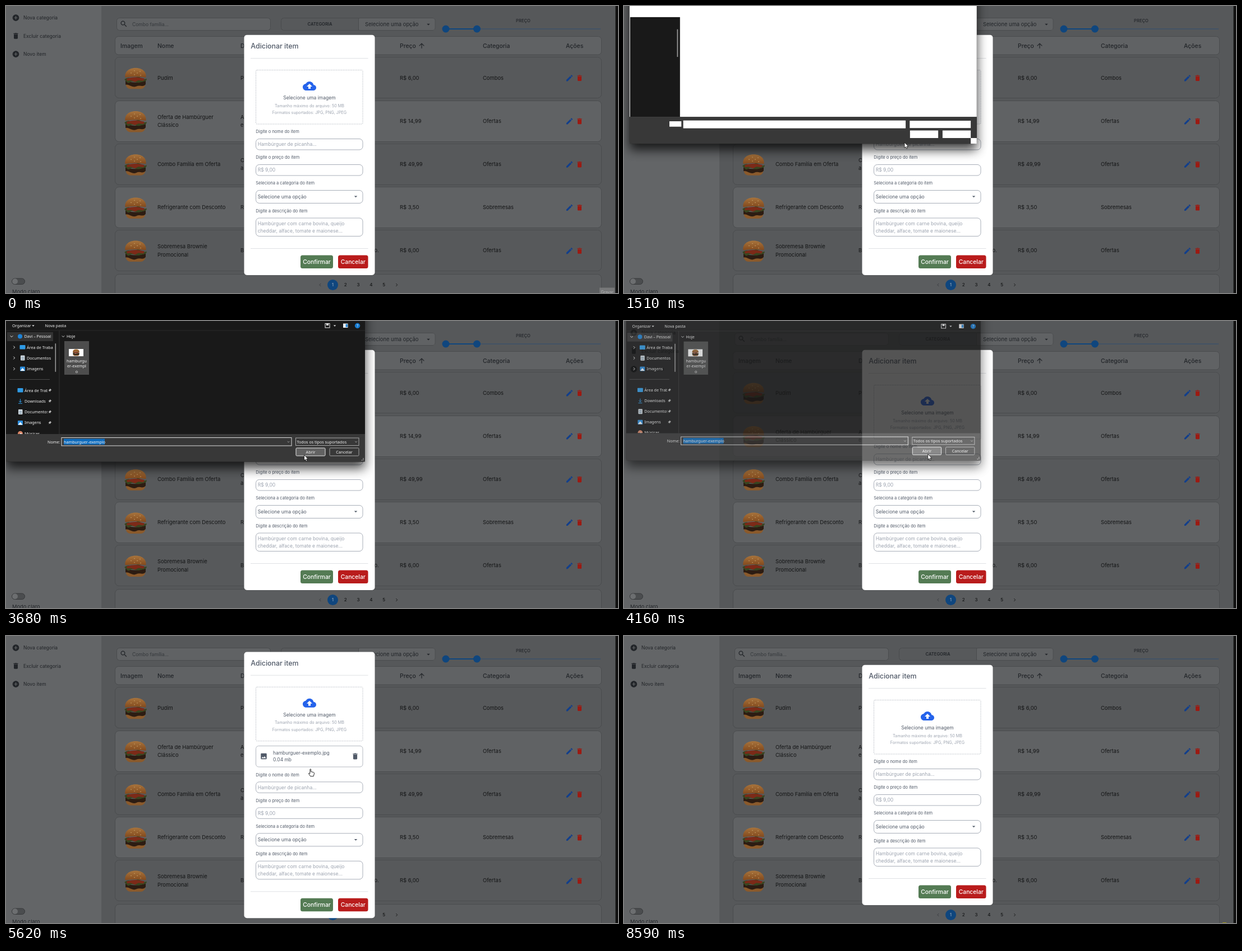
An HTML page that plays this animation: 1091 by 513 pixels, repeating every 8660 ms.

```html
<!DOCTYPE html>
<html lang="pt-BR">
<head>
<meta charset="utf-8">
<title>Adicionar item</title>
<style>
html, body { margin: 0; width: 100%; height: 100%; overflow: hidden; background: #56585a; }
svg { display: block; width: 1091px; height: 513px; font-family: Inter, sans-serif; }
text { white-space: pre; }
#dialog { font-family: "Noto Sans", "Open Sans", sans-serif; }
</style>
</head>
<body>
<svg id="stage" viewBox="0 0 1091 513"></svg>
<script>
const LOOP = 8660;
const SHIFT = 23.3;

const ICONS = {
  plus: 'M12 2C6.48 2 2 6.48 2 12s4.48 10 10 10 10-4.48 10-10S17.52 2 12 2zm5 11h-4v4h-2v-4H7v-2h4V7h2v4h4v2z',
  trash: 'M6 19c0 1.1.9 2 2 2h8c1.1 0 2-.9 2-2V7H6v12zM19 4h-3.5l-1-1h-5l-1 1H5v2h14V4z',
  pencil: 'M3 17.25V21h3.75L17.81 9.94l-3.75-3.75L3 17.25zM20.71 7.04c.39-.39.39-1.02 0-1.41l-2.34-2.34c-.39-.39-1.02-.39-1.41 0l-1.83 1.83 3.75 3.75 1.83-1.83z',
  search: 'M15.5 14h-.79l-.28-.27C15.41 12.59 16 11.11 16 9.5 16 5.91 13.09 3 9.5 3S3 5.91 3 9.5 5.91 16 9.5 16c1.61 0 3.09-.59 4.23-1.57l.27.28v.79l5 4.99L20.49 19l-4.99-5zm-6 0C7.01 14 5 11.99 5 9.5S7.01 5 9.5 5 14 7.01 14 9.5 11.99 14 9.5 14z',
  image: 'M21 19V5c0-1.1-.9-2-2-2H5c-1.1 0-2 .9-2 2v14c0 1.1.9 2 2 2h14c1.1 0 2-.9 2-2zM8.5 13.5l2.5 3.01L14.5 12l4.5 6H5l3.5-4.5z',
  cloud: 'M19.35 10.04C18.67 6.59 15.64 4 12 4 9.11 4 6.6 5.64 5.35 8.04 2.34 8.36 0 10.91 0 14c0 3.31 2.69 6 6 6h13c2.76 0 5-2.24 5-5 0-2.64-2.05-4.78-4.65-4.96zM14 13v4h-4v-4H7l5-5 5 5h-3z',
  up: 'M4 12l1.41 1.41L11 7.83V20h2V7.83l5.58 5.59L20 12l-8-8-8 8z',
  caret: 'M7 9.5l5 5 5-5z',
  right: 'M9 6l6 6-6 6', left: 'M15 6l-6 6 6 6', down: 'M6 9l6 6 6-6',
  pin: 'M14 3l7 7-2 1-4 4-1 4-4-4-6 5 5-6-4-4 4-1 4-4z'
};

// Markup helpers; text and icons are placed by their centre line
const text = (x, cy, size, str, fill, attrs = '') =>
  `<text x="${x}" y="${cy + size * .355}" font-size="${size}" fill="${fill}" ${attrs}>${str}</text>`;
const mid = 'text-anchor="middle"';
const rect = (x, y, w, h, fill, attrs = '') =>
  `<rect x="${x}" y="${y}" width="${w}" height="${h}" fill="${fill}" ${attrs}/>`;
const box = (x, y, w, h, fill, stroke, r) => rect(x, y, w, h, fill, `stroke="${stroke}" rx="${r}"`);
const line = (x1, y1, x2, y2, color, w = 1) =>
  `<path d="M${x1} ${y1}L${x2} ${y2}" stroke="${color}" stroke-width="${w}"/>`;
const disc = (x, y, r, fill) => `<circle cx="${x}" cy="${y}" r="${r}" fill="${fill}"/>`;
const place = (x, y, scale) => `transform="translate(${x} ${y}) scale(${scale}) translate(-12 -12)"`;
const icon = (name, x, y, scale, fill) => `<path ${place(x, y, scale)} d="${ICONS[name]}" fill="${fill}"/>`;
const stroke = (name, x, y, scale, color) =>
  `<path ${place(x, y, scale)} d="${ICONS[name]}" fill="none" stroke="${color}" stroke-width="2.4"/>`;
const burger = (x, y, scale = 1) => `<use href="#burger" transform="translate(${x} ${y}) scale(${scale})"/>`;

const defs = `<defs>
  <linearGradient id="bun" x2="0" y2="1"><stop stop-color="#a8743c"/><stop offset="1" stop-color="#82491d"/></linearGradient>
  <g id="burger">
    <path d="M-17 8C-18 15-14 18-9 18.5H9C14 18 18 15 17 8Z" fill="#8a5a2c"/>
    <path d="M-18 4q18 6 36 0v6q-3 4-8 3t-9 1-10-1-9-2Z" fill="#2c1c12"/>
    <path d="M-19.5 1q5-4 10-2t10-1 9 1 10 1q1 4-4 5t-8 2-9-1-9 1-9-5Z" fill="#38451f"/>
    <path d="M-16 0q16-5 32 0l-2 4-9-1-6 3-8-3-6 1Z" fill="#7c2a18"/>
    <path d="M-18.5-2C-20-13-11-19 0-19S20-13 18.5-2Q0-5-18.500-2Z" fill="url(#bun)"/>
    <path d="M-9-10h2m4-4h2m3 4h2m3-3h2m-12 6h2m9 1h2" stroke="#c29a62"/>
  </g>
  <filter id="blur" x="-20%" y="-30%" width="140%" height="160%"><feGaussianBlur stdDeviation="10"/></filter>
  <clipPath id="nav"><rect y="17" width="84" height="185"/></clipPath>
  <clipPath id="quick"><rect y="17" width="74" height="185"/></clipPath>
</defs>`;

const ITEMS = [
  [['Pudim'], 'P', '6,00', 'Combos'],
  [['Oferta de Hambúrguer', 'Clássico'], 'Ae', '14,99', 'Ofertas'],
  [['Combo Família em Oferta'], 'Ca', '49,99', 'Ofertas'],
  [['Refrigerante com Desconto'], 'R', '3,50', 'Sobremesas'],
  [['Sobremesa Brownie', 'Promocional'], 'B', '6,00', 'Ofertas']
];

function page() {
  const ink = '#141516', soft = '#222529', edge = '#4a4c4e', pale = '#606264', dim = '#57595b';
  const blue = '#0f467e', red = '#9c1a12';
  const stack = (x, cy, lines) => lines.map((s, i) =>
    text(x, cy + (i - (lines.length - 1) / 2) * 14.2, 9.4, s, ink)).join('');
  let s = rect(0, 0, 1091, 513, '#56585a') + rect(0, 0, 170, 513, '#636567');
  [['plus', 'Nova categoria', 21], ['trash', 'Excluir categoria', 53.5], ['plus', 'Novo item', 86]].forEach(([i, label, y]) =>
    s += icon(i, 17.5, y, .58, soft) + text(31, y, 8.5, label, soft));
  s += box(10.5, 487, 23, 10.5, '#4b4d4f', '#36383a', 5.2) + disc(16, 492.2, 5, '#6c6e70') + text(11, 511, 9.3, 'Modo claro', soft);

  s += box(197.5, 21.5, 274, 22, pale, edge, 5) + icon('search', 210, 32, .62, soft) + text(225, 32.5, 8.5, 'Combo família...', '#35383c');
  s += box(490.5, 21.5, 274.5, 22, dim, edge, 5) + rect(628, 22, 136.5, 21, pale, 'rx="4"') + line(628.5, 22, 628.5, 43, edge);
  s += text(559.5, 32.5, 7.6, 'CATEGORIA', soft, mid + ' font-weight="600"') + text(640, 32.5, 9.4, 'Selecione uma opção', soft) + icon('caret', 753, 33, .55, soft);
  s += text(922, 26, 7.6, 'PREÇO', soft, mid + ' font-weight="500"') + line(784, 41, 1060, 41, '#3c5168', 1.6) +
    line(784, 41, 839, 41, blue, 2.2) + disc(784, 41, 6.5, blue) + disc(839.5, 41, 6.5, blue);

  s += box(194.5, 54.5, 867, 32.5, pale, edge, 6);
  [[204, 'Imagem'], [270, 'Nome'], [418, 'D'], [702, 'Preço'], [850, 'Categoria'], [998, 'Ações']].forEach(([x, label]) =>
    s += text(x, 71, 10.4, label, soft, 'font-weight="500"'));
  s += icon('up', 741, 71, .6, soft);

  ITEMS.forEach(([name, desc, price, group], i) => {
    const y = 128.3 + i * 77.2;
    s += box(194.5, Math.round(y - 37) + .5, 867, 73, i % 2 ? pale : dim, edge, 7) + burger(231, y + 1.5) +
      stack(270, y, name) + stack(418, y, [...desc]) + text(702, y, 9.4, 'R$ ' + price, ink) +
      text(850, y, 9.4, group, ink) + icon('pencil', 1004.5, y + .5, .62, '#123f8c') + icon('trash', 1022.5, y + .5, .58, red);
  });
  s += text(656.5, 437, 9.4, 'o.', ink);

  s += box(194.5, 479.5, 867, 50, '#5b5d5f', edge, 7) + disc(582.5, 498.5, 9.5, blue);
  for (let n = 1; n < 6; n++) s += text(559.7 + n * 22.8, 498.5, 8, n, n > 1 ? ink : '#8fa3ba', mid + ' font-weight="500"');
  s += stroke('left', 560, 498.5, .4, '#35383c') + stroke('right', 696.5, 498.5, .4, ink);
  return s + rect(1086.5, 0, 4.5, 513, '#101010') +
    `<g id="tip">${rect(1058, 503.5, 27, 10, '#777879') + text(1071.5, 512, 7, 'Gravar', '#b9babb', mid)}</g>` +
    `<g id="spark">${rect(1067, 512, 7, 1, '#a59a1c')}</g>`;
}

function modal() {
  const dark = '#515a68', hint = '#9ca3af', border = '#a8aeb8';
  const button = (x, w, fill, label) => rect(x, 445.5, w, 23.5, fill, 'rx="3.5"') +
    text(x + w / 2, 457.3, 10.3, label, '#fff', mid + ' font-weight="500"');
  const field = (y, h, label, lines, color) => text(445.3, y - 12.7, 7.5, label, dark) +
    box(445.5, y, 190.5, h, '#fff', border, 6) +
    lines.map((l, i) => text(448.7, y + h / 2 + (i - (lines.length - 1) / 2) * 13, 8.55, l, color)).join('');
  return `<rect id="card" x="424.5" width="233" rx="5" fill="#fff"/>
  <g id="upper">${text(436.3, 72, 12.4, 'Adicionar item', dark, 'font-weight="500"')}
    ${line(436, 93.5, 645.5, 93.5, '#dfe1e4')}
    <rect id="zone" x="445.5" y="114.5" width="190.5" height="96.5" rx="2" stroke="#b3b8c0" stroke-dasharray="1.5 1.5"/>
    ${icon('cloud', 541, 143, 1, '#2563eb')}
    ${text(541, 164, 8.5, 'Selecione uma imagem', dark, mid)}
    ${text(541, 178, 7.2, 'Tamanho máximo do arquivo: 50 MB', hint, mid)}
    ${text(541, 190.5, 7.2, 'Formatos suportados: JPG, PNG, JPEG', hint, mid)}</g>
  <g id="file">${box(445.5, 196.5, 190.5, 37.5, '#fff', '#b4b9c1', 5)}
    <g id="fileInfo">${icon('image', 459.5, 215, .58, dark)}
    ${text(476, 209.5, 8.45, 'hamburguer-exemplo.jpg', dark)}
    ${text(476, 221.5, 8.45, '0.04 mb', dark)}
    ${icon('trash', 622.5, 215, .6, dark)}</g></g>
  <g id="lower">${field(237.5, 19.5, 'Digite o nome do item', ['Hambúrguer de picanha...'], hint)}
    ${field(283.5, 19.5, 'Digite o preço do item', ['R$ 9,00'], hint)}
    ${field(329.5, 23, 'Seleciona a categoria do item', ['Selecione uma opção'], dark)}
    ${icon('caret', 623.5, 341, .55, dark)}
    ${field(379, 32.5, 'Digite a descrição do item', ['Hambúrguer com carne bovina, queijo', 'cheddar, alface, tomate e maionese...'], hint)}
    ${line(436, 433.5, 645.5, 433.5, '#dfe1e4')}
    ${button(525, 58, '#547b54', 'Confirmar')}${button(592, 53.5, '#b91c1c', 'Cancelar')}</g>`;
}

function dialog() {
  const ink = '#f1f1f1', size = 7.2;
  const label = (x, y, str, attrs) => text(x, y, size, str, ink, attrs);
  const picture = {
    desk: (x, y) => rect(x - 5, y - 4, 10, 7.5, '#2f9be6', 'rx="1"'),
    doc: (x, y) => rect(x - 3.5, y - 4.5, 7.5, 9, '#cfd8de', 'rx="1"') +
      line(x - 2, y - 1, x + 2.5, y - 1, '#5f7f98') + line(x - 2, y + 2, x + 2.5, y + 2, '#5f7f98'),
    pics: (x, y) => rect(x - 4.5, y - 4, 9, 8, '#2d8fe0', 'rx="1"') + `<path d="M${x - 4} ${y + 3.5}l4-5 4 5z" fill="#fff"/>`,
    down: (x, y) => `<path d="M${x} ${y - 4}v6m-2.5-2.5l2.5 2.5 2.5-2.5M${x - 3.5} ${y + 4}h7" fill="none" stroke="#2f9be6"/>`,
    music: (x, y) => disc(x, y, 4.5, '#d98667') + disc(x + 1, y + 1, 1.6, '#fff')
  };
  let nav = rect(2, 20, 82, 16, '#333') + stroke('down', 10, 27.5, .4, ink) + disc(25, 27.5, 4, '#1c83d8') + label(32.5, 27.5, 'Davi – Pessoal');
  [['desk', 'Área de Trabalho', 47], ['doc', 'Documentos', 66], ['pics', 'Imagens', 85.5]].forEach(([p, name, y]) =>
    nav += stroke('right', 14.5, y, .4, ink) + picture[p](29.5, y) + label(37, y, name));
  nav += line(6, 104.5, 78, 104.5, '#4a4a4a');
  let quick = '', pins = '';
  [['desk', 'Área de Trabalho'], ['down', 'Downloads'], ['doc', 'Documentos'], ['pics', 'Imagens'], ['music', 'Músicas']].forEach(([p, name], i) => {
    const y = 124 + i * 19.3;
    quick += picture[p](25.5, y) + label(33, y, name);
    if (i < 4) pins += icon('pin', 78, y, .35, '#b9b9b9');
  });
  const fields = [[99, 208.5, 410, 14.5], [516.5, 209, 112.5, 13.5], [517, 227, 52, 14], [577, 227, 52, 14]];
  const [nameBox, typeBox, , cancelBox] = fields;

  return rect(0, -70, 640, 333, '#000', 'filter="url(#blur)" opacity=".75"') + rect(0, -70, 640, 321.5, '#191919', 'rx="4"') +
  `<g id="full">
    ${label(11, 8.5, 'Organizar')}${icon('caret', 48.5, 8.5, .45, ink)}${label(69.5, 8.5, 'Nova pasta')}
    ${rect(569, 4.5, 8, 7.5, 'none', 'stroke="#eee"') + rect(571, 5, 4, 3, '#eee')}${icon('caret', 586, 8.5, .45, ink)}
    ${rect(601, 4.5, 8.5, 7.5, '#f1f1f1') + rect(605.5, 5.5, 3.5, 5.5, '#2f8bd8')}
    ${disc(626.5, 8.5, 4.7, '#1479cf') + text(626.5, 8.5, 7, '?', '#fff', mid)}
    ${line(0, 17, 640, 17, '#2b2b2b')}${line(95, 17, 95, 202, '#333')}
    <g clip-path="url(#nav)">${nav}<g clip-path="url(#quick)">${quick}</g>${pins}</g>
    ${rect(87.5, 40, 1.6, 51, '#9a9a9a', 'rx=".8"')}
    ${stroke('down', 102, 27.5, .36, ink)}${label(108, 27.5, 'Hoje')}
    <rect id="tile" x="104" y="36" width="44" height="60"/>
    ${rect(112, 50, 26, 13, '#fff')}${burger(125, 56.5, .31)}
    ${['hamburgu', 'er-exempl', 'o'].map((l, i) => label(126, 71 + i * 9.6, l, mid)).join('')}
  </g>
  <g id="blank">${rect(0, -70, 640, 272, '#fff')}${rect(1, 17.5, 92, 184.5, '#191919')}${rect(87.5, 40, 1.8, 51, '#999')}</g>
  ${rect(0, 202, 640, 49.5, '#383838')}
  <g id="controls">
    ${label(74, 216, 'Nome:')}${box(...nameBox, '#383838', '#dcdcdc', 0)}${stroke('down', 503.5, 216, .3, '#ccc')}
    <g id="name">${rect(103, 210.5, 73, 10.5, '#0f6cbd')}${label(103, 216, 'hamburguer-exemplo')}</g>
    ${box(...typeBox, '#383838', '#a5a5a5', 0)}${label(518.5, 216, 'Todos os tipos suportados')}${stroke('down', 624, 216, .3, '#ccc')}
    <rect id="open" x="517" y="227" width="52" height="14" rx="1.5" stroke="#e6e6e6"/>${label(543, 234, 'Abrir', mid)}
    ${box(...cancelBox, '#383838', '#a5a5a5', 1.5)}${label(603, 234, 'Cancelar', mid)}
    <path d="M637 245v5M634.5 248v2" stroke="#aaa" stroke-width="1.5" stroke-dasharray="1.5 1"/>
  </g>
  <g id="blankControls">${rect(73.5, 210, 22, 10, '#fff')}${fields.map(f => rect(...f, '#fff')).join('')}${rect(629, 241, 11, 10.5, '#fff')}</g>`;
}

const pointers = `<g id="pointer" stroke-linejoin="round">
  <path id="arrow" d="M0 0V9.8L2.2 7.8 3.7 11.2 5.4 10.5 3.9 7.2H7Z" fill="#fff" stroke="#111" stroke-width=".8"/>
  <path id="hand" d="M-.8.8Q0-.5.9.8V5l5 1.3Q7 7 6.8 8.5L5.5 13.3H0L-3.3 8.3Q-3 7-.8 8.5Z" fill="#fff" stroke="#111" stroke-width=".9"/>
  <path id="beam" d="M-2-5h1.5L0-4.500.5-5H2M0-4.500v9M-2 5h1.5L0 4.500.5 5H2" fill="none" stroke="#222" stroke-width=".9"/>
</g>`;

const stage = document.getElementById('stage');
stage.innerHTML = defs + `<g>${page()}</g><g>${modal()}</g><g id="dialog">${dialog()}</g>` + pointers;
const $ = Object.fromEntries([...stage.querySelectorAll('[id]')].map(el => [el.id, el]));

// Pointer path: time, x, y, shape
const PATH = [
  [70, 1010, 480, 'arrow'], [210, 850, 385, 'arrow'], [350, 690, 265, 'arrow'], [520, 565, 190, 'hand'],
  [690, 541, 172, 'hand'], [950, 541, 172, 'hand'], [1300, 520, 215, 'arrow'], [1510, 500.5, 244, 'arrow'],
  [1780, 369, 209, 'arrow'], [2330, 129.5, 87.5, 'arrow'], [2930, 129.5, 87.5, 'arrow'], [3270, 501, 244, 'arrow'],
  [3470, 501, 244, 'arrow'], [3750, 541.5, 238, 'arrow'], [5620, 542.5, 237.5, 'hand'], [6090, 624, 215, 'hand'],
  [6760, 625, 214.5, 'arrow'], [7370, 625, 214.5, 'arrow'], [7650, 630, 240, 'beam'], [7790, 633, 255, 'beam'],
  [7920, 633, 255, 'arrow'], [8060, 974, 453, 'arrow'], [8130, 974, 453, '']
];
// Dialog poses: time, scale, opacity, still blank
const POSES = [
  [0, 1, 0, 0], [1370, .93, .35, 1], [1440, .95, .8, 1], [1510, .967, 1, 1], [1580, .985, 1, 0], [1650, 1, 1, 0],
  [4090, .996, .92, 0], [4160, .9875, .74, 0], [4230, .975, .3, 0], [4290, 1, 0, 0]
];

const show = (el, on) => el.style.display = on ? '' : 'none';
const at = (table, t) => table.findLastIndex(k => k[0] <= t);
const during = (t, a, b) => t >= a && t < b;

function movePointer(t) {
  const i = at(PATH, t), [t0, x0, y0, shape] = PATH[i] || [0, 0, 0, ''];
  for (const kind of ['arrow', 'hand', 'beam']) show($[kind], kind === shape);
  if (!shape) return;
  const [t1, x1, y1] = PATH[i + 1], p = (t - t0) / (t1 - t0);
  $.pointer.setAttribute('transform', `translate(${x0 + (x1 - x0) * p} ${y0 + (y1 - y0) * p})`);
}

function poseDialog(t) {
  const [, scale, opacity, blank] = POSES[at(POSES, t)];
  show($.dialog, opacity > 0);
  $.dialog.setAttribute('opacity', opacity);
  $.dialog.setAttribute('transform', `translate(300 90) scale(${scale}) translate(-300 -90)`);
  show($.full, !blank);
  show($.controls, !blank);
  show($.blank, blank);
  show($.blankControls, blank);
  const chosen = t >= 2860, over = during(t, 2190, 3000);
  $.tile.setAttribute('fill', chosen ? (over ? '#686868' : '#4d4d4d') : over ? '#454545' : 'none');
  show($.name, chosen);
  $.open.setAttribute('fill', t >= 3680 ? '#626262' : '#383838');
}

function layoutModal(t) {
  const open = during(t, 4360, 6760), d = open ? SHIFT : 0;
  $.card.setAttribute('y', 51.8 - d);
  $.card.setAttribute('height', 429.2 + 2 * d);
  $.upper.setAttribute('transform', `translate(0 ${-d})`);
  $.lower.setAttribute('transform', `translate(0 ${d})`);
  $.zone.setAttribute('fill', during(t, 480, 3600) ? '#f6f7f8' : '#fff');
  show($.file, open);
  $.fileInfo.setAttribute('opacity', Math.max(0, Math.min(1, .35 + (t - 4360) / 400)));
}

function draw(now) {
  const t = now % LOOP;
  layoutModal(t);
  poseDialog(t);
  movePointer(t);
  show($.tip, t < 70);
  show($.spark, t >= 8590);
}

const start = performance.now();
(function tick() {
  draw(performance.now() - start);
  requestAnimationFrame(tick);
})();
</script>
</body>
</html>
```
